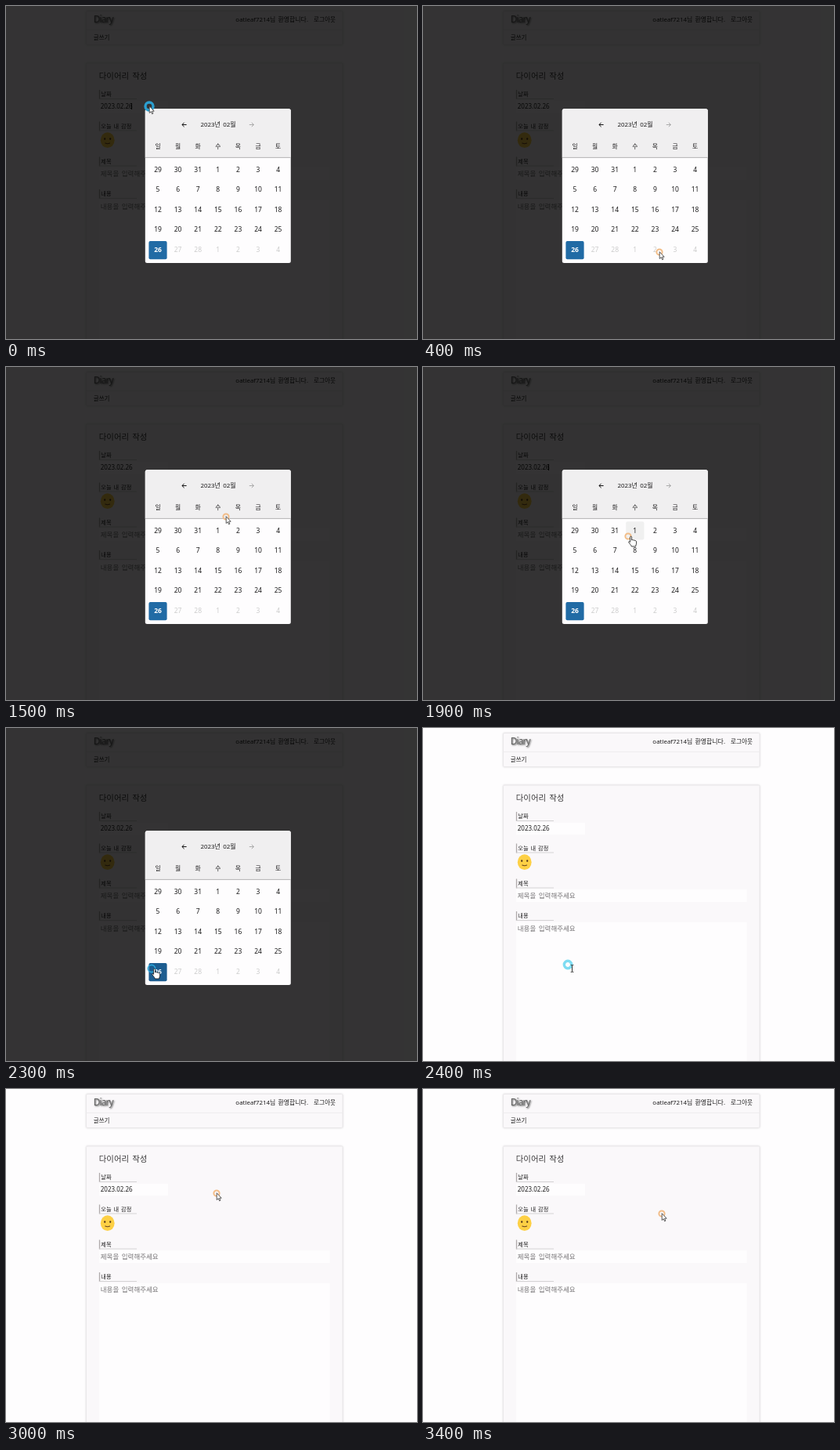
An HTML page for the animation above (3.5 s loop, 525 by 425 pixels).

```html
<!DOCTYPE html>
<html lang="ko">
<head>
<meta charset="utf-8">
<title>다이어리 작성</title>
<style>
  html, body { margin: 0; width: 100%; height: 100%; overflow: hidden; background: #fefdfe; }
  svg { display: block; width: 525px; height: 425px; }
  text { font-family: "Noto Sans", "Noto Sans CJK KR", "Noto Sans CJK", sans-serif; fill: #1c1b1c; word-spacing: .15em; }
  .card { fill: #faf8fa; stroke: #eae8ea; filter: drop-shadow(0 0 1px #0002); }
  .field { fill: #fefdfe; }
  .title { fill: #3a393a; }
  .hint { fill: #767476; }
  .brand { font-size: 11.8px; letter-spacing: -.85px; fill: #666; text-shadow: 1px 1px 2px #555; }
  .mid { text-anchor: middle; }
  .off { fill: #ccc; }
  .picked { fill: #fff; font-weight: 700; }
</style>
</head>
<body>
<svg id="stage" viewBox="0 0 525 425">
  <g id="page">
    <rect class="card" x="102.5" y="6.5" width="327.5" height="43" rx="1.5"/>
    <path d="M103 30.5H430" stroke="#eeecee"/>
    <rect class="card" x="102.5" y="73" width="327.5" height="370" rx="1.5"/>
    <rect class="field" x="119" y="121" width="88" height="15"/>
    <rect class="field" x="119" y="206" width="294.5" height="16"/>
    <rect class="field" x="119" y="248" width="294.5" height="190"/>
    <text class="brand" x="111.8" y="21.3">Diary</text>
  </g>
  <g id="face">
    <ellipse cx="129.7" cy="171.2" rx="8.9" ry="9.9" fill="#fdd045"/>
    <g fill="#55391c">
      <ellipse cx="126.2" cy="169.6" rx="1.1" ry="1.4"/>
      <ellipse cx="133.2" cy="169.6" rx="1.1" ry="1.4"/>
    </g>
    <path d="M126.8 175Q129.7 176.4 132.6 175" fill="none" stroke="#6b4520" stroke-width="1.1" stroke-linecap="round"/>
  </g>
  <path id="caret" d="M160.5 124V132" stroke="#000"/>
  <g id="modal">
    <rect width="525" height="425" fill="#000" fill-opacity=".795"/>
    <rect x="177.8" y="131.3" width="186" height="196.6" rx="2.5" fill="#fefdfe"/>
    <path d="M177.8 193.5V133.8a2.5 2.5 0 0 1 2.5-2.5H361.3a2.5 2.5 0 0 1 2.5 2.5V193.5Z" fill="#f0eff0"/>
    <path d="M178 193.4H363.6" stroke="#b4b3b4"/>
    <g fill="none" stroke-width="1">
      <path d="M230.6 151.5H225M227.6 148.8L224.9 151.5L227.6 154.2" stroke="#111"/>
      <path d="M310.8 151.5H316.4M313.8 148.8L316.5 151.5L313.8 154.2" stroke="#aaa"/>
    </g>
    <rect id="hover" width="23.2" height="23.2" rx="2" fill="#f0f0f0"/>
    <rect id="chosen" x="182.4" y="300" width="23.2" height="23.2" rx="2"/>
  </g>
  <g id="pointer">
    <circle id="ring" fill="none"/>
    <path id="arrow" d="M.2 -.3V8.5L2.2 6.7L3.6 9.8L4.9 9.2L3.6 6.2H6.2Z" fill="#fff" stroke="#333" stroke-width=".8"/>
    <path id="hand" d="M2.6 1.2C2.6-.1 4.6-.1 4.6 1.2V5C5.4 4.3 6.5 4.5 6.8 5.2C7.6 4.7 8.6 5 8.8 5.8C9.7 5.4 10.6 5.9 10.6 6.9V9.2C10.6 10.6 9.6 11.4 9.6 13H4.3C4 11.2 1.6 9.4.7 7.6C.4 6.7 1.5 6.2 2.6 7.4Z" fill="#fff" stroke="#111" stroke-width=".8"/>
    <path id="beam" d="M3.8 .5H5L5.5 1L6 .5H7.2M5.5 1V9M3.8 9.5H5L5.5 9L6 9.5H7.2" fill="none" stroke="#333" stroke-width="1"/>
  </g>
</svg>
<script>
  const LOOP = 3500, STEP = 25.6;
  const byId = id => document.getElementById(id);
  const show = (id, on) => byId(id).style.display = on ? '' : 'none';

  function add(parent, tag, attrs, content = '') {
    const node = document.createElementNS('http://www.w3.org/2000/svg', tag);
    for (const key in attrs) node.setAttribute(key, attrs[key]);
    node.textContent = content;
    byId(parent).append(node);
    return node;
  }
  const write = (parent, content, x, y, size, kind = '') =>
    add(parent, 'text', { x, y, 'font-size': size, class: kind }, content);

  function label(content, top) {
    add('page', 'path', { d: `M119.5 ${top}V${top + 12}`, stroke: '#b0aaab', 'stroke-width': 1.3 });
    add('page', 'path', { d: `M119 ${top + 11.5}H167`, stroke: '#d0ced0', 'stroke-width': .9 });
    write('page', content, 121.3, top + 8.3, 7.2);
  }

  write('page', 'oatleaf7214님 환영합니다.', 386, 20.4, 7.9).setAttribute('text-anchor', 'end');
  write('page', '로그아웃', 393, 20.4, 7.6);
  write('page', '글쓰기', 111.8, 42.8, 7.5);
  write('page', '다이어리 작성', 118.8, 93.2, 10.4, 'title');
  label('날짜', 107);
  label('오늘 내 감정', 147.5);
  label('제목', 192.5);
  label('내용', 234);
  write('page', '2023.02.26', 120.8, 130.8, 8);
  write('page', '제목을 입력해주세요', 120.8, 217.3, 8.5, 'hint');
  write('page', '내용을 입력해주세요', 120.8, 259.1, 8.5, 'hint');

  write('modal', '2023년 02월', 271, 154, 7.95, 'mid');
  [...'일월화수목금토'].forEach((day, i) => write('modal', day, 194 + i * STEP, 182.4, 7.8, 'mid'));
  for (let i = 0; i < 35; i++) {
    const day = i < 3 ? 29 + i : (i - 3) % 28 + 1;
    const kind = i === 28 ? ' picked' : i > 28 ? ' off' : '';
    write('modal', day, 194 + i % 7 * STEP, 211.5 + Math.floor(i / 7) * 25.55, 8.5, 'mid' + kind);
  }

  // Pointer stops: time, x, y, shape
  const stops = [
    [0, 183, 128, 'arrow'], [100, 133, 150, 'arrow'], [200, 230, 163, 'arrow'],
    [300, 313, 166, 'arrow'], [400, 302, 314, 'arrow'], [500, 240, 316, 'arrow'],
    [600, 194, 311, 'hand'], [1300, 203, 298, 'arrow'], [1400, 241, 250, 'hand'],
    [1500, 281, 191, 'arrow'], [1600, 293, 178, 'arrow'], [1700, 288, 172, 'arrow'],
    [1800, 276, 187, 'arrow'], [1900, 262, 216, 'hand'], [2000, 240, 246, 'hand'],
    [2100, 213, 281, 'hand'], [2200, 190, 304, 'hand'], [2300, 186, 307, 'hand'],
    [2400, 185, 302, 'beam'], [2500, 186, 317, 'beam'], [2600, 188, 276, 'beam'],
    [2700, 190.5, 226.5, 'arrow'], [2800, 129, 174, 'arrow'], [2900, 200, 148, 'arrow'],
    [3000, 269, 133, 'arrow'], [3100, 279, 139, 'arrow'], [3200, 290, 147, 'arrow'],
    [3300, 300, 155, 'arrow'], [3400, 305, 159, 'arrow']
  ];

  // Ring looks: radius, line width, colour
  const idle = [3.6, 2, '#f2bd88'];
  const press = [4.6, 1.6, '#2ba6d8'];
  const burstDark = [5, 3.4, '#2b9fd0'];
  const burstLight = [4.7, 3.4, '#7fdcf2'];

  function ringAt(t) {
    if (t < 100) return burstDark;
    if (t >= 2300 && t < 2400) return press;
    if (t >= 2400 && t < 2500) return burstLight;
    return idle;
  }

  function draw(t) {
    const [, x, y, shape] = stops.findLast(stop => stop[0] <= t);
    const open = t < 2400;
    show('modal', open);
    show('caret', open && (t + 200) % 1000 < 500);

    const col = Math.floor((x - 182.4) / STEP), row = Math.floor((y - 197.4) / 25.55);
    const onDay = open && shape === 'hand' && row >= 0 && row < 4;
    show('hover', onDay);
    if (onDay) {
      byId('hover').setAttribute('x', 182.4 + col * STEP);
      byId('hover').setAttribute('y', 197.3 + row * 25.55);
    }
    byId('chosen').setAttribute('fill', shape === 'hand' && row === 4 && col === 0 ? '#1d5d90' : '#216ba5');

    byId('pointer').setAttribute('transform', `translate(${x} ${y})`);
    ['arrow', 'hand', 'beam'].forEach(id => show(id, id === shape));
    const [radius, width, colour] = ringAt(t);
    const ring = byId('ring');
    ring.setAttribute('r', radius);
    ring.setAttribute('stroke-width', width);
    ring.setAttribute('stroke', colour);
  }

  const start = performance.now();
  function tick() {
    draw((performance.now() - start) % LOOP);
    requestAnimationFrame(tick);
  }
  tick();
</script>
</body>
</html>
```
